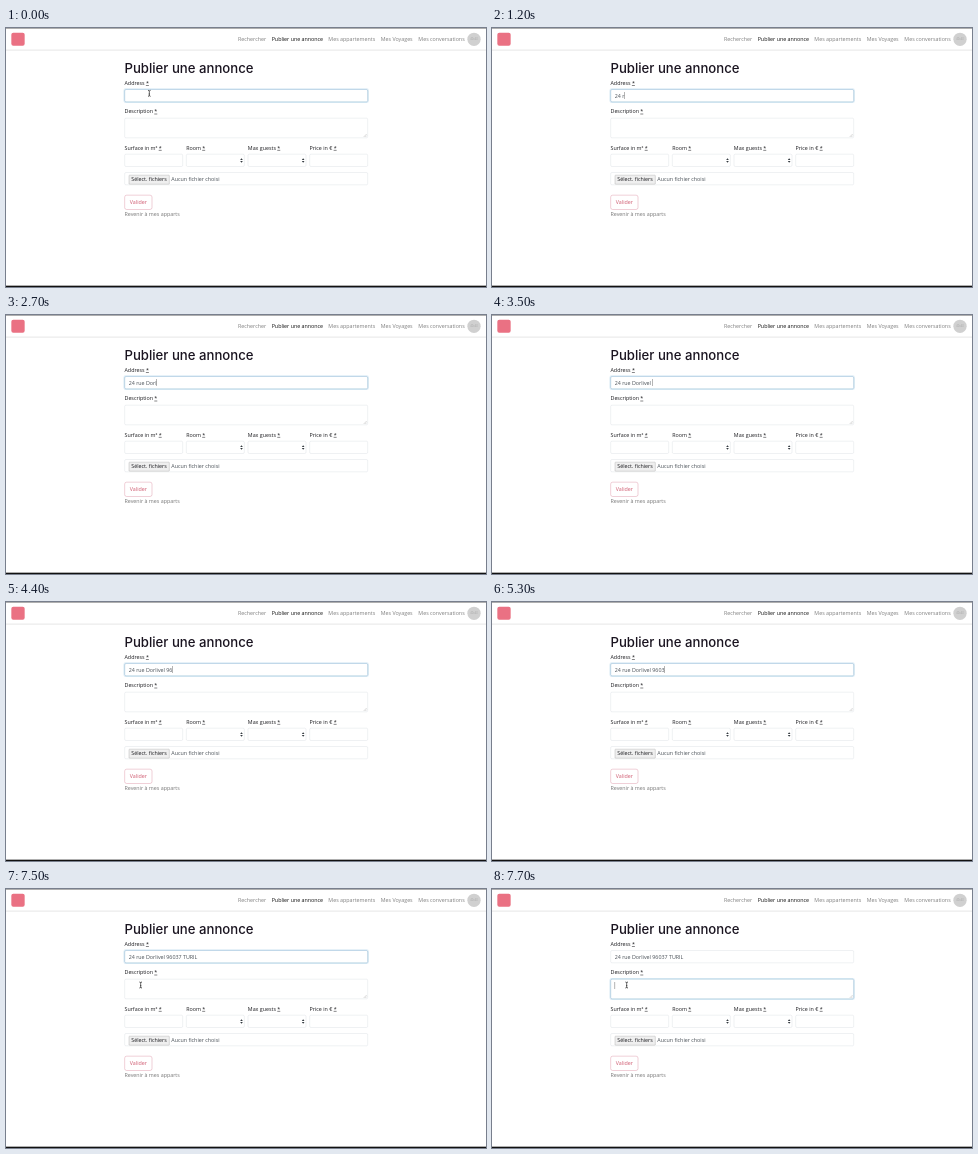
Animation of 480 by 259 pixels, one loop 8 s. Source, as an HTML page:

```html
<!DOCTYPE html>
<html lang="fr">
<head>
<meta charset="utf-8">
<title>Publier une annonce</title>
<style>
  html, body { margin: 0; width: 100%; height: 100%; overflow: hidden; background: #fff; }
  svg { display: block; width: 100vw; height: 100vh; }
  text { font: 16px "Open Sans", "Noto Sans", sans-serif; fill: #1b1b1f; white-space: pre; }
  .title { font: 500 39.5px Inter, "Open Sans", sans-serif; font-optical-sizing: none; fill: #1a1420; }
  .muted { fill: #7f7f7f; }
  .value { fill: #495057; }
  .active { fill: #111; }
  .box { fill: #fff; stroke: #ced4da; }
  .ring { fill: none; stroke: rgba(70, 150, 200, .18); stroke-width: 3.2; }
  .edge { fill: none; stroke: #86b8d8; stroke-width: 1.2; }
  .caret { fill: #444; }
</style>
</head>
<body>
<!-- One unit is a third of a stage pixel. -->
<svg id="stage" viewBox="0 0 1440 777"></svg>
<script>
const LOOP = 8000, STEP = 100, BLINK = 500;
const LEFT = 355.5, WIDTH = 730, COLUMN = 185;
const ADDRESS = "24 rue Dorlivel 96037 TURIL";
const KEY_TIMES = [
  700, 800, 900, 1200, 1300, 1400, 1600,
  2100, 2400, 2600, 2700, 2900, 3100, 3200, 3300, 3500,
  4100, 4400, 5000, 5300, 5500, 5700,
  5900, 6100, 6300, 6400, 6600
];
const FOCUS_AT = 100, POINTER_BACK = 7200, POINTER_STOP = 7500, FOCUS_FADE = 150;

const stage = document.getElementById("stage");

function add(tag, attrs, parent = stage) {
  const node = document.createElementNS("http://www.w3.org/2000/svg", tag);
  for (const name in attrs) node.setAttribute(name, attrs[name]);
  return parent.appendChild(node);
}

function write(x, y, string, attrs = {}) {
  const node = add("text", { x, y, ...attrs });
  node.textContent = string;
  return node;
}

function box(x, y, width, height, attrs = {}) {
  return add("rect", { x: x + .5, y: y + .5, width: width - 1, height: height - 1, rx: 4, class: "box", ...attrs });
}

function label(x, y, string) {
  const node = write(x, y, string + " *");
  const end = node.getComputedTextLength();
  add("path", { d: `M${x + end - 9} ${y + 2.5}h9`, stroke: "#1b1b1f", "stroke-width": 1.6 });
}

function focusRing(y, height) {
  const group = add("g", {});
  add("rect", { x: LEFT - 1.6, y: y - 1.6, width: WIDTH + 3.2, height: height + 3.2, rx: 5.6, class: "ring" }, group);
  add("rect", { x: LEFT + .5, y: y + .5, width: WIDTH - 1, height: height - 1, rx: 4, class: "edge" }, group);
  return group;
}

function selectArrows(x, y) {
  add("path", { d: `M${x - 4} ${y - 1.5}l4 -5l4 5zM${x - 4} ${y + 1.5}l4 5l4 -5z`, fill: "#343a40" });
}

function drawNavbar() {
  add("rect", { width: 1440, height: 2, fill: "#888" });
  add("rect", { y: 65, width: 1440, height: 2.5, fill: "#e2e2e2" });
  add("rect", { x: 16, y: 14, width: 40, height: 39, rx: 6, fill: "#ea7183" });
  write(696, 40, "Rechercher", { class: "muted" });
  write(797, 40, "Publier une annonce", { class: "active" });
  write(967, 40, "Mes appartements", { class: "muted" });
  write(1124, 40, "Mes Voyages", { class: "muted" });
  write(1237, 40, "Mes conversations", { class: "muted" });
  add("circle", { cx: 1404, cy: 34, r: 20, fill: "#d0d0d0" });
  write(1404, 37, "40x40", { "text-anchor": "middle", style: "font-size:8px;fill:#aaa" });
}

function drawForm() {
  write(LEFT, 134, "Publier une annonce", { class: "title" });
  label(LEFT, 170, "Address");
  box(LEFT, 184, WIDTH, 38);
  label(LEFT, 255.5, "Description");
  box(LEFT, 270, WIDTH, 60);
  add("path", { d: "M1073 327l9 -9M1078 327l4 -4", stroke: "#888", "stroke-width": 1 });

  ["Surface in m²", "Room", "Max guests", "Price in €"].forEach((name, i) => {
    const x = LEFT + i * COLUMN;
    label(x, 364.5, name);
    box(x, 378, COLUMN - 10, 38);
    if (i === 1 || i === 2) selectArrows(x + 166, 397.5);
  });

  box(LEFT, 433, WIDTH, 38);
  box(368.5, 441, 122, 28, { style: "fill:#efefef;stroke:#999", rx: 2 });
  write(376, 460, "Sélect. fichiers");
  write(496, 460, "Aucun fichier choisi", { class: "value" });

  box(LEFT, 501, 83, 44, { style: "stroke:#d27288", rx: 6 });
  write(LEFT + 41.5, 529, "Valider", { "text-anchor": "middle", style: "fill:#cf5a70" });
  write(LEFT, 563.5, "Revenir à mes apparts", { style: "fill:#777" });
  add("rect", { y: 773, width: 1440, height: 4, fill: "#111" });
}

drawNavbar();
drawForm();
const addressRing = focusRing(184, 38);
const descriptionRing = focusRing(270, 60);
const address = write(368, 209, "", { class: "value" });
const caret = add("rect", { width: 1.2, height: 21, class: "caret" });
const pointer = add("path", {
  d: "M-4 -9q4 0 4 3q0 -3 4 -3M0 -6v12M-4 9q4 0 4 -3q0 3 4 3M-2 2h4",
  fill: "none", stroke: "#222", "stroke-width": 2
});

const clamp = v => Math.max(0, Math.min(1, v));
const show = (node, visible) => node.setAttribute("visibility", visible ? "visible" : "hidden");

function render(time) {
  const t = Math.floor(time / STEP) * STEP;
  const typed = KEY_TIMES.filter(key => key <= t).length;
  address.textContent = ADDRESS.slice(0, typed);

  const focus = clamp((t - POINTER_STOP) / FOCUS_FADE);
  addressRing.setAttribute("opacity", 1 - focus);
  descriptionRing.setAttribute("opacity", focus);

  const lastKey = typed ? KEY_TIMES[typed - 1] : FOCUS_AT;
  const inDescription = focus > 0;
  const advance = typed ? address.getComputedTextLength() : 0;
  caret.setAttribute("x", 368 + (inDescription ? 0 : advance));
  caret.setAttribute("y", inDescription ? 279 : 192);
  show(caret, t >= FOCUS_AT && (inDescription || (t - lastKey) % (2 * BLINK) < BLINK));

  const travel = clamp((t - POINTER_BACK) / (POINTER_STOP - POINTER_BACK));
  const ease = travel * travel * (3 - 2 * travel);
  pointer.setAttribute("transform", `translate(${430 - 26 * ease} ${196 + 92 * ease})`);
  show(pointer, t < KEY_TIMES[0] || t >= POINTER_BACK);
}

const start = performance.now();
function tick() {
  render((performance.now() - start) % LOOP);
  requestAnimationFrame(tick);
}
tick();
</script>
</body>
</html>
```
